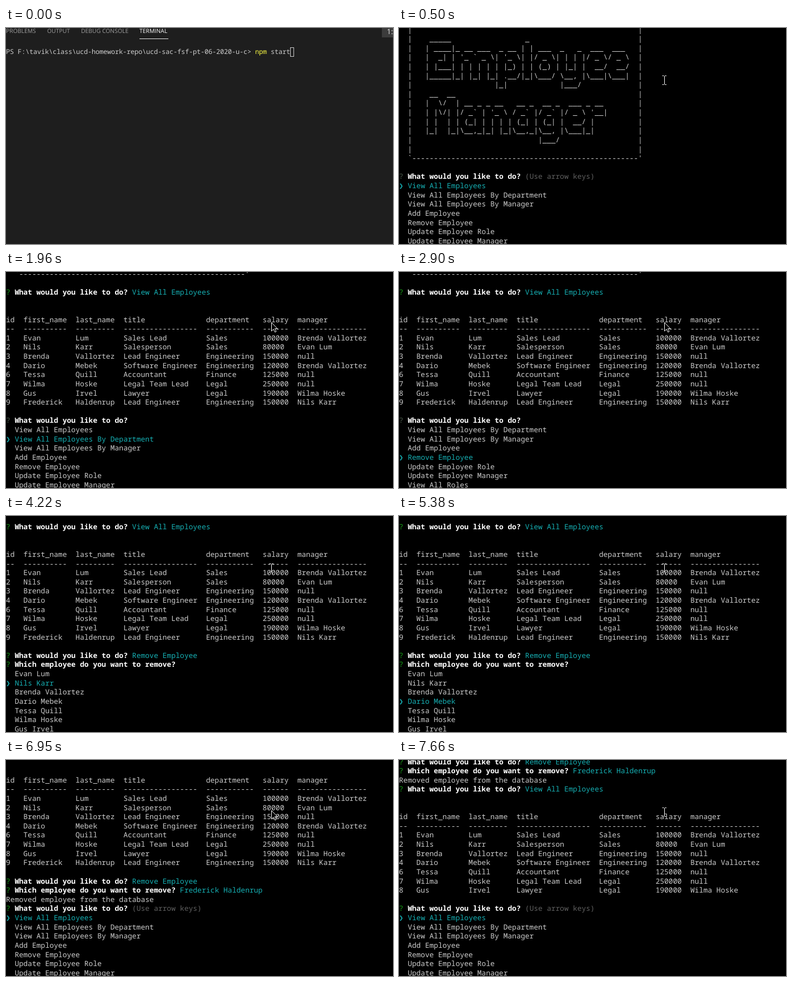
An HTML page that plays this animation: 696 by 391 pixels, repeating every 8000 ms.

```html
<!DOCTYPE html>
<html lang="en">
<head>
<meta charset="utf-8">
<title>Employee Manager</title>
<style>
  html, body { margin: 0; width: 100%; height: 100%; overflow: hidden; background: #000; }
  #stage { position: relative; width: 696px; height: 391px; overflow: hidden; text-rendering: geometricPrecision; }
  #editor, #term, #mouse { position: absolute; inset: 0; }
  #editor { background: #1e1e1e; }
  #editor > * { position: absolute; white-space: pre; }
  .tab { top: -1px; font: 10.4px/14px "Open Sans", sans-serif; color: #a0a0a0; }
  .tab.on { color: #fff; }
  .bar { left: 240px; top: 19px; width: 52px; height: 1px; background: #e7e7e7; }
  .picker { left: 676px; top: 0; width: 11px; height: 17px; padding-left: 9px; background: #3c3c3c;
            font: 13px/13px "Open Sans", sans-serif; color: #f0f0f0; }
  .shell { left: 0; top: 34px; font: 12px/17px "Noto Sans Mono", monospace; letter-spacing: -.2px; color: #ccc; }
  .shell b { font-weight: 400; color: #f5f543; }
  .caret { left: 511px; top: 35px; width: 5px; height: 15px; border: 1px solid #ccc; }
  #term { background: #000; font: 13px/18px "Noto Sans Mono", "DejaVu Sans Mono", monospace;
          letter-spacing: .02px; color: #ccc; font-variant-ligatures: none; }
  #term div { position: absolute; left: 0; white-space: pre; }
  #term b { color: #fff; }
  .mark { color: #16a016; }
  .dim { color: #4a5a4a; }
  .hint { color: #606060; }
  .pick { color: #16b0b4; }
  .on.pick { font-weight: 500; }
  #beam { mix-blend-mode: difference; }
</style>
</head>
<body>
<div id="stage">
  <div id="term"></div>
  <svg id="mouse" width="696" height="391">
    <path id="beam" fill="none" stroke="#fff" d="M-3.5 -8.5h3M1 -8.5h3M.5 -8V7M-3.5 7.5h3M1 7.5h3"/>
    <path id="arrow" fill="#000" stroke="#fff" d="M.5 .5v15.5l3.6-3.4 2.5 5.2 2.4-1-2.5-5.2h4.7z"/>
  </svg>
  <div id="editor">
    <span class="tab" style="left:0">PROBLEMS</span>
    <span class="tab" style="left:74px">OUTPUT</span>
    <span class="tab" style="left:135px">DEBUG CONSOLE</span>
    <span class="tab on" style="left:240px">TERMINAL</span>
    <i class="bar"></i>
    <span class="picker">1:</span>
    <span class="shell">PS F:\tavik\class\ucd-homework-repo\ucd-sac-fsf-pt-06-2020-u-c&gt; <b>npm</b> start</span>
    <i class="caret"></i>
  </div>
</div>
<pre id="art" hidden>
  _____                 _
 | ____|_ __ ___  _ __ | | ___  _   _  ___  ___
 |  _| | '_ ` _ \| '_ \| |/ _ \| | | |/ _ \/ _ \
 | |___| | | | | | |_) | | (_) | |_| |  __/  __/
 |_____|_| |_| |_| .__/|_|\___/ \__, |\___|\___|
                 |_|            |___/
  __  __
 |  \/  | __ _ _ __   __ _  __ _  ___ _ __
 | |\/| |/ _` | '_ \ / _` |/ _` |/ _ \ '__|
 | |  | | (_| | | | | (_| | (_| |  __/ |
 |_|  |_|\__,_|_| |_|\__,_|\__, |\___|_|
                           |___/
</pre>
<script>
const LOOP = 8000, ROWS = 24, PITCH = 16.62, BASE = 7.5;
const $ = id => document.getElementById(id);
const span = (cls, text) => `<span class="${cls}">${text}</span>`;

const menu = ['View All Employees', 'View All Employees By Department', 'View All Employees By Manager',
  'Add Employee', 'Remove Employee', 'Update Employee Role', 'Update Employee Manager', 'View All Roles'];

const widths = [2, 10, 9, 17, 11, 6, 16];
const head = ['id', 'first_name', 'last_name', 'title', 'department', 'salary', 'manager'];
const staff = [
  [1, 'Evan', 'Lum', 'Sales Lead', 'Sales', 100000, 'Brenda Vallortez'],
  [2, 'Nils', 'Karr', 'Salesperson', 'Sales', 80000, 'Evan Lum'],
  [3, 'Brenda', 'Vallortez', 'Lead Engineer', 'Engineering', 150000, 'null'],
  [4, 'Dario', 'Mebek', 'Software Engineer', 'Engineering', 120000, 'Brenda Vallortez'],
  [6, 'Tessa', 'Quill', 'Accountant', 'Finance', 125000, 'null'],
  [7, 'Wilma', 'Hoske', 'Legal Team Lead', 'Legal', 250000, 'null'],
  [8, 'Gus', 'Irvel', 'Lawyer', 'Legal', 190000, 'Wilma Hoske'],
  [9, 'Frederick', 'Haldenrup', 'Lead Engineer', 'Engineering', 150000, 'Nils Karr']
];
const names = staff.map(p => p[1] + ' ' + p[2]);

const row = cells => cells.map((c, i) => String(c).padEnd(widths[i])).join('  ');
const table = people => ['', '', row(head), row(widths.map(w => '-'.repeat(w))), ...people.map(row), ''];

const framed = text => '  |' + ('  ' + text).padEnd(52) + '|';
const art = $('art').textContent.replace(/\n$/, '').split('\n');
const logo = ['', ...art, ''].map(framed).concat('  `' + '-'.repeat(52) + "'", '');

const DO = 'What would you like to do?', WHO = 'Which employee do you want to remove?';
const ask = (q, tail, mark = 'mark') => `${span(mark, '?')} <b>${q}</b> ${tail}`;
const answer = (q, a) => ask(q, span('pick', a));

// Scrollback before each prompt
const listed = [...logo, answer(DO, menu[0]), ...table(staff)];
const removing = [...listed, answer(DO, menu[4])];
const removed = [...removing, answer(WHO, names[7]), 'Removed employee from the database'];
const relisted = [...removed, answer(DO, menu[0]), ...table(staff.slice(0, 7))];
const prompts = [
  { log: logo, q: DO, list: menu, mark: 'dim' },
  { log: listed, q: DO, list: menu, mark: 'dim' },
  { log: removing, q: WHO, list: names },
  { log: removed, q: DO, list: menu },
  { log: relisted, q: DO, list: menu }
];

// [time, prompt, selected item]
const steps = [[500, 0, 0], [880, 1, 0], [1960, 1, 1], [2280, 1, 2], [2580, 1, 3], [2900, 1, 4],
  [3290, 2, 0], [4220, 2, 1], [4450, 2, 2], [5380, 2, 3], [5540, 2, 4], [5620, 2, 5],
  [5780, 2, 6], [6170, 2, 7], [6560, 3, 0], [7660, 4, 0]];

// [time, shape, x, y]
const moves = [[500, 'beam', 477, 95], [1030, 'beam', 375, 250], [1110, 'beam', 430, 305],
  [1190, 'beam', 546, 35], [1270, 'beam', 477, 95], [1420, 'arrow', 477, 91],
  [3290, 'beam', 477, 95], [6950, 'arrow', 477, 91], [7660, 'beam', 477, 95]];

// Seven visible choices; the list wraps once the pointer reaches the fourth
function choices(list, sel) {
  const top = Math.max(0, sel - 3);
  return Array.from({ length: 7 }, (_, i) => {
    const n = top + i, text = list[n % list.length];
    return n === sel ? span('on pick', '❯ ' + text) : '  ' + text;
  });
}

function drawTerm([, id, sel]) {
  const { log, q, list, mark } = prompts[id];
  const hint = sel ? '' : span('hint', '(Use arrow keys)');
  const lines = [...log, ask(q, hint, mark), ...choices(list, sel)].slice(-ROWS);
  $('term').innerHTML = lines.map((text, r) =>
    `<div style="top:${Math.round(BASE + PITCH * r) - 14}px">${text}</div>`).join('');
}

function drawMouse([, shape, x, y]) {
  for (const id of ['beam', 'arrow']) $(id).style.display = id === shape ? '' : 'none';
  $(shape).setAttribute('transform', `translate(${x} ${y})`);
}

const current = (list, t) => list.findLast(s => s[0] <= t);
let step, move;
const start = performance.now();

function tick() {
  const t = (performance.now() - start) % LOOP;
  const s = current(steps, t), m = current(moves, t);
  $('editor').style.display = s ? 'none' : '';
  if (s && s !== step) drawTerm(step = s);
  if (m && m !== move) drawMouse(move = m);
  requestAnimationFrame(tick);
}
tick();
</script>
</body>
</html>
```
